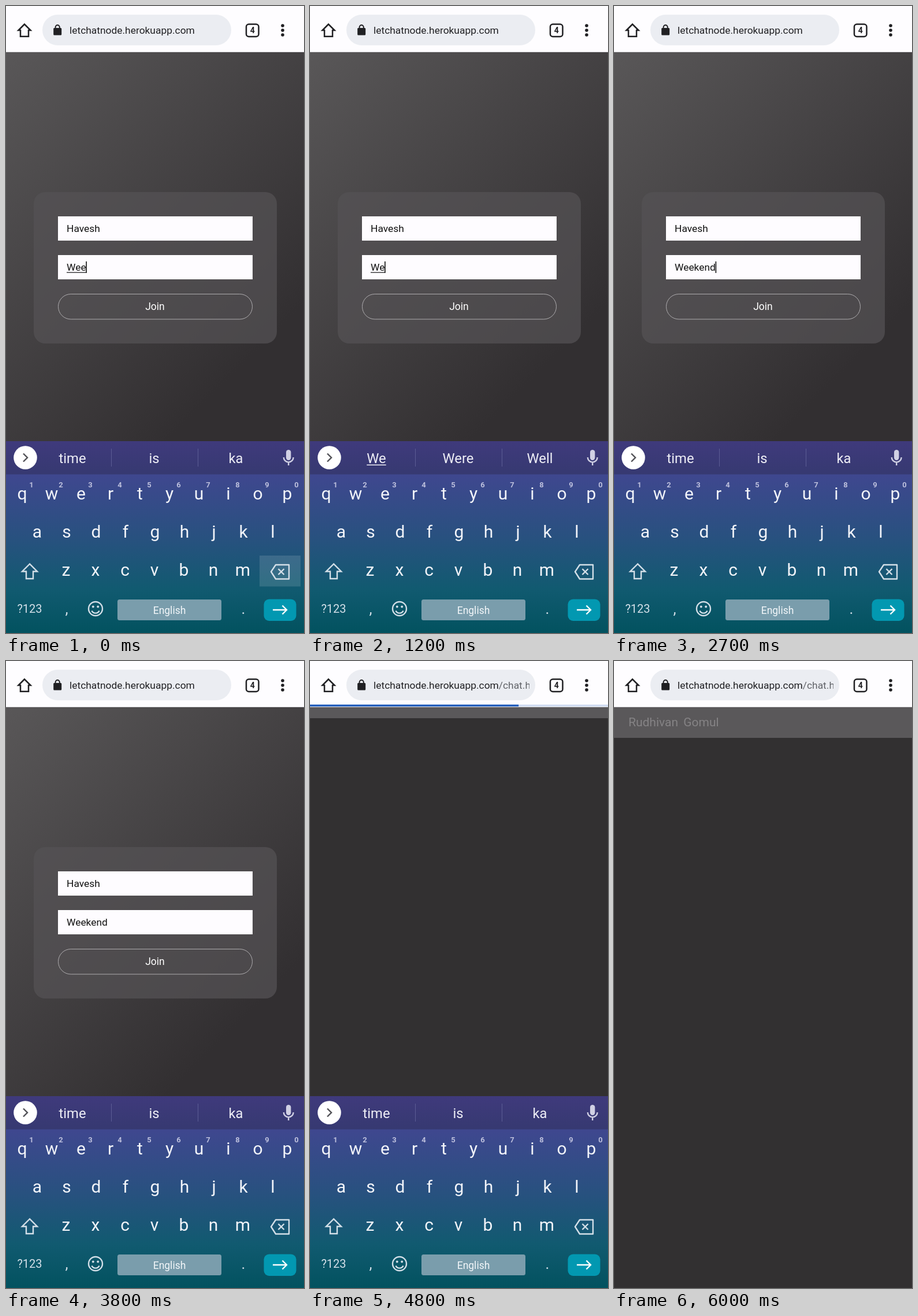
An HTML page that plays this animation: 516x1085 px, repeating every 7100 ms.

```html
<!DOCTYPE html>
<html lang="en">
<head>
<meta charset="utf-8">
<title>Joining a chat room</title>
<style>
  html, body { margin: 0; width: 100%; height: 100%; overflow: hidden; background: #323031; }
  svg { display: block; width: 516px; height: 1085px; font-family: Roboto, sans-serif; }
  .mid { text-anchor: middle; }
  .line { fill: none; stroke-width: 2.4; }
  .field { font-size: 17.4px; fill: #111; }
</style>
</head>
<body>
<svg viewBox="0 0 516 1085">
  <defs>
    <linearGradient id="wall" gradientUnits="userSpaceOnUse" x1="0" y1="80" x2="476" y2="556">
      <stop stop-color="#595758"/><stop offset="1" stop-color="#322f31"/>
    </linearGradient>
    <linearGradient id="strip" x2="0" y2="1">
      <stop stop-color="#3f3a7c"/><stop offset="1" stop-color="#363971"/>
    </linearGradient>
    <linearGradient id="board" x2="0" y2="1">
      <stop stop-color="#3f478f"/><stop offset=".4" stop-color="#28517f"/>
      <stop offset=".72" stop-color="#115a70"/><stop offset="1" stop-color="#02525f"/>
    </linearGradient>
    <clipPath id="urlClip"><rect x="100" y="20" width="280" height="44"/></clipPath>
  </defs>

  <rect width="516" height="1085" fill="#323031"/>

  <g id="form">
    <rect y="80" width="516" height="1005" fill="url(#wall)"/>
    <rect x="48" y="322" width="421" height="262" rx="20" fill="#555355" fill-opacity=".72"/>
    <path d="M90 364h337v42H90zM90 431h337v42H90z" fill="#fefcff"/>
    <text class="field" x="105" y="391">Havesh</text>
    <text class="field" x="105" y="458" id="room"></text>
    <rect id="underline" x="105" y="460.5" height="1.2" fill="#111"/>
    <rect id="caret" y="442" width="1.6" height="20" fill="#111"/>
    <rect x="90.5" y="498.5" width="336" height="43.5" rx="21.7" fill="none" stroke="#aeacae"/>
    <text class="mid" x="258" y="526" font-size="17.5" fill="#fff">Join</text>
  </g>

  <g id="chat">
    <rect id="header" y="80" width="516" fill="#5a585a"/>
    <text id="members" x="25" y="113" font-size="21" word-spacing="4" fill="#858385">Rudhivan Gomul</text>
  </g>

  <g id="keyboard">
    <rect y="753" width="516" height="58" fill="url(#strip)"/>
    <rect y="810.5" width="516" height="275" fill="url(#board)"/>
    <circle cx="33.5" cy="781.5" r="20.3" fill="#fff"/>
    <path class="line" d="M30 774.5l7 7-7 7" stroke="#505055"/>
    <g id="words" font-size="23.8" fill="#eeeef6">
      <path d="M182.5 766v31M332.5 766v31" stroke="#5b5c94"/>
      <text class="mid" x="115" y="791"></text>
      <text class="mid" x="256.5" y="791"></text>
      <text class="mid" x="398" y="791"></text>
      <rect id="wordLine" y="793.5" height="1.5"/>
    </g>
    <rect x="485" y="768" width="8.4" height="18" rx="4.2" fill="#d0d0e4"/>
    <path class="line" d="M480.8 781a8.4 8.4 0 0 0 16.8 0M489.2 789.5v5.5" stroke="#d0d0e4"/>
    <rect id="pressed" x="439" y="951" width="71" height="53.5" fill="#fff" fill-opacity=".13"/>
    <g id="keys" class="mid" font-size="30" fill="#f3f5fa"></g>
    <g class="line" stroke="#d3dfe8">
      <path d="M41 965.5L28 978.5h7V991h12v-12.5h7z"/>
      <path stroke-linejoin="round" d="M459 979l8-12h23v24.5h-23zM471.5 974l10 10M481.5 974l-10 10"/>
      <circle cx="155" cy="1043" r="12"/>
      <path d="M148.5 1046.5a7 6.5 0 0 0 13 0"/>
    </g>
    <g fill="#d3dfe8">
      <circle cx="150.8" cy="1039.5" r="1.9"/><circle cx="159.2" cy="1039.5" r="1.9"/>
      <text class="mid" x="41" y="1050" font-size="20">?123</text>
      <text class="mid" x="105" y="1052" font-size="26">,</text>
      <text class="mid" x="411" y="1052" font-size="26">.</text>
    </g>
    <rect x="193" y="1027" width="180" height="36" rx="3.5" fill="#7a9dac"/>
    <text class="mid" x="283" y="1052" font-size="17.5" fill="#f3f7fa">English</text>
    <rect x="446.5" y="1026.5" width="56" height="37.5" rx="9" fill="#0298b1"/>
    <path class="line" d="M462 1045h24M478.5 1037.5l7.5 7.5-7.5 7.5" stroke="#fff"/>
  </g>

  <rect width="516" height="79" fill="#fefdff"/>
  <rect y="79" width="516" height="1" fill="#d9d9dc"/>
  <rect x="63" y="15" width="327" height="53" rx="26.5" fill="#ebedf2"/>
  <g fill="none" stroke="#202023" stroke-width="2.5">
    <path d="M32 31.5L21.5 42H25v10.8h14V42h3.5z"/>
    <path d="M85.6 40v-3.3a3.6 3.6 0 0 1 7.2 0V40" stroke-width="2"/>
    <rect x="416" y="31.5" width="21.5" height="21.5" rx="4.5"/>
  </g>
  <g fill="#202023">
    <rect x="82.2" y="38" width="14" height="12.5" rx="1.5"/>
    <text class="mid" x="426.7" y="47.2" font-size="14" font-weight="700">4</text>
    <circle cx="479" cy="34" r="2.8"/><circle cx="479" cy="42" r="2.8"/><circle cx="479" cy="50" r="2.8"/>
    <text x="110" y="48.3" font-size="17.4" clip-path="url(#urlClip)">letchatnode.herokuapp.com<tspan id="path" fill="#606267">/chat.html</tspan></text>
  </g>
  <g id="progress">
    <rect y="75.5" width="516" height="3.2" fill="#cedaf0"/>
    <rect id="bar" y="75.5" height="3.2" fill="#1a58b9"/>
  </g>
</svg>
<script>
const LOOP = 7100, STEP = 100, BLINK = 500;
const $ = id => document.getElementById(id);
const attr = (el, values) => { for (const k in values) el.setAttribute(k, values[k]); };
const show = (id, on) => $(id).style.display = on ? '' : 'none';

function addKey(x, y, label, style = {}) {
  const key = document.createElementNS('http://www.w3.org/2000/svg', 'text');
  key.textContent = label;
  attr(key, { x, y, ...style });
  $('keys').append(key);
}
[['qwertyuiop', 28, 854], ['asdfghjkl', 54, 920], ['zxcvbnm', 104, 986]].forEach(([row, x, y]) =>
  [...row].forEach((c, i) => addKey(x + 51 * i, y, c)));
[...'1234567890'].forEach((d, i) =>
  addKey(44 + 51 * i, 833, d, { 'font-size': 13, 'font-weight': 700, fill: '#bdc0dd' }));

// [time, field text, suggestions, whether the word is still being composed]
const idle = ['time', 'is', 'ka'];
const edits = [
  [0, 'Wee', idle, true],
  [200, 'We', idle, true],
  [400, 'W', idle, true],
  [500, 'W', ['W', 'E', 'We'], true],
  [1000, 'We', ['We', 'Were', 'Well'], true],
  [1400, 'Wee', ['Wee', 'Week', 'Weekend'], true],
  [1800, 'Week', ['Week', 'Weekend', "Week'"], true],
  [2300, 'Weekend', idle, false]
];
// [time, fraction loaded]
const loads = [[0, 0], [4400, .1], [4500, .4], [4600, .7], [5200, .85], [5300, 1]];
const latest = (list, t) => list.filter(item => item[0] <= t).pop();

const words = $('words').querySelectorAll('text');

function drawTyping(t) {
  const [start, text, picks, composing] = latest(edits, t);
  $('room').textContent = text;
  const width = $('room').getComputedTextLength();
  attr($('underline'), { width });
  attr($('caret'), { x: 104.7 + width });
  show('underline', composing);
  show('caret', (t - start) % (2 * BLINK) < BLINK);

  words.forEach((word, i) => word.textContent = picks[i]);
  const wordWidth = words[0].getComputedTextLength();
  attr($('wordLine'), { x: 115 - wordWidth / 2, width: wordWidth });
  show('wordLine', picks !== idle);
  show('pressed', t < 500);
}

function draw(now) {
  const t = Math.floor(now % LOOP / STEP) * STEP;
  const joined = t >= 4800, sliding = t >= 4900, listed = t >= 6000;
  show('form', !joined);
  show('chat', joined);
  show('members', listed);
  attr($('header'), { height: listed ? 53 : 19 });

  show('keyboard', t < 5000);
  show('words', !sliding);
  attr($('keyboard'), { transform: `translate(0 ${sliding ? 184 : 0})`, opacity: sliding ? .2 : 1 });
  if (t < 5000) drawTyping(t);

  show('path', t >= 4400);
  show('progress', t >= 4400 && t < 5400);
  attr($('bar'), { width: 516 * latest(loads, t)[1] });
}

const begin = performance.now();
function tick() {
  draw(performance.now() - begin);
  requestAnimationFrame(tick);
}
tick();
</script>
</body>
</html>
```
